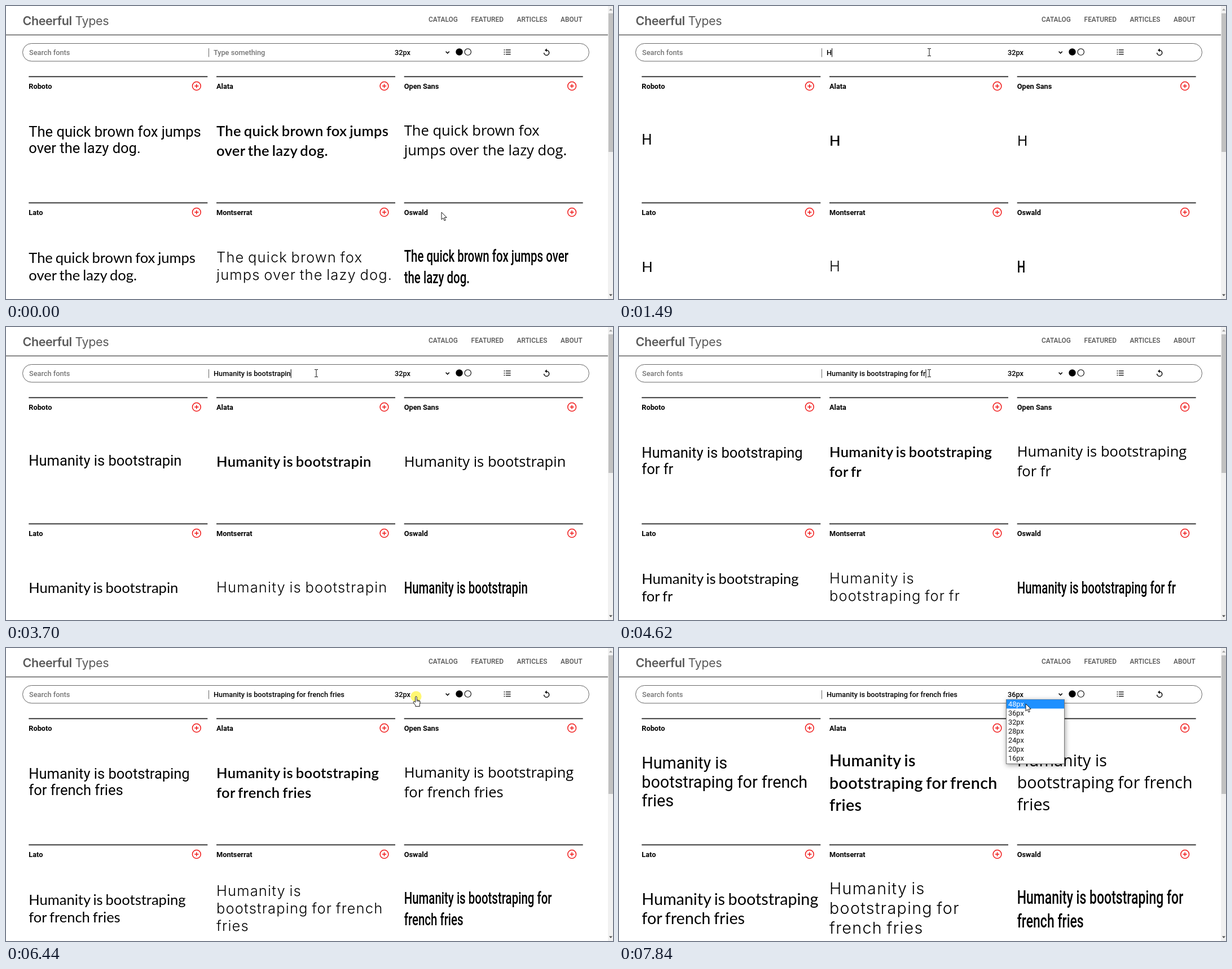
An HTML page that plays this animation: 1076 by 520 pixels, repeating every 8000 ms.

```html
<!DOCTYPE html>
<html lang="en">
<head>
<meta charset="utf-8">
<title>Font catalog</title>
<style>
  html, body { margin: 0; width: 100%; height: 100%; overflow: hidden; background: #fff; }
  svg { display: block; width: 1076px; height: 520px; }
  text { font: 500 12.75px Roboto, sans-serif; white-space: pre; }
  .nav { font-size: 11.9px; fill: #555; }
  .logo { font: 400 21.5px Inter, sans-serif; letter-spacing: -.4px; fill: #5a5a5a; }
  .logo tspan { font-weight: 600; }
  .label { font-weight: 600; }
  .hint { fill: #757575; }
  .item { font-weight: 400; }
</style>
</head>
<body>
<svg id="stage" viewBox="0 0 1076 520" xmlns="http://www.w3.org/2000/svg"></svg>
<script>
const LOOP = 8000;
const SCALE = 0.797;
const SAMPLE = 'The quick brown fox jumps over the lazy dog.';
const PHRASE = 'Humanity is bootstraping for french fries';
const SIZES = [48, 36, 32, 28, 24, 20, 16];

// asc, line, track and gap (word spacing) are in em;
// caps = characters per line for sample, phrase, large phrase
const FACES = [
  { name: 'Roboto', family: 'Roboto', weight: 400, asc: .927, line: 1.172, caps: [27, 27, 23] },
  { name: 'Alata', family: 'Lato', weight: 600, asc: 1.108, line: 1.379, caps: [27, 26, 23], track: .013, gap: -.07 },
  { name: 'Open Sans', family: 'Open Sans', weight: 400, asc: 1.069, line: 1.362, caps: [24, 26, 23] },
  { name: 'Lato', family: 'Lato', weight: 400, asc: .987, line: 1.2, caps: [27, 27, 27], gap: -.06 },
  { name: 'Montserrat', family: 'Inter', weight: 300, asc: .968, line: 1.219, caps: [24, 23, 20], track: .046, gap: -.07 },
  { name: 'Oswald', family: 'Roboto', weight: 500, asc: 1.193, line: 1.482, caps: [33, 34, 30], zoom: 1.137, narrow: .705 }
];

// time of each keystroke
const KEYS = [
  1490, 1560, 1710, 1800, 1880, 1970, 2130, 2210, 2370, 2440, 2510, 2590, 2660,
  2830, 2910, 3000, 3150, 3300, 3300, 3470, 3470, 3620, 3700, 3850, 3920, 4070,
  4160, 4320, 4390, 4620, 4620, 4700, 4870, 4950, 5020, 5170, 5250, 5340, 5430, 5810, 5880
];

// time, x, y, pointer shape, click halo
const POINTER = [
  [0, 772, 366, 'arrow'], [70, 748, 335, 'arrow'], [140, 690, 255, 'arrow'],
  [220, 610, 160, 'arrow'], [290, 560, 111, 'arrow'], [460, 554, 96, 'beam'],
  [540, 551, 85, 'beam'], [620, 550, 82, 'beam'], [700, 550, 82, 'beam', 1],
  [780, 550, 82, 'beam'], [6030, 562, 82, 'beam'], [6100, 605, 83, 'beam'],
  [6180, 662, 85, 'beam'], [6260, 705, 86, 'hand'], [6350, 726, 86, 'hand'],
  [6440, 727, 86, 'hand', 1], [6500, 726, 87, 'arrow'], [6660, 726, 101, 'arrow'],
  [6740, 725, 111, 'arrow'], [6820, 725, 115, 'arrow'], [7000, 725, 117, 'arrow'],
  [7060, 725, 118, 'arrow'], [7220, 725, 118, 'arrow', 1], [7290, 725, 117, 'arrow'],
  [7370, 723, 100, 'arrow'], [7450, 721, 80, 'hand'], [7530, 721, 77, 'hand', 1],
  [7610, 721, 82, 'arrow'], [7690, 721, 90, 'arrow'], [7840, 721, 99, 'arrow']
];

// time, highlighted row (-1 = closed)
const MENU = [[0, -1], [6500, 2], [6660, 0], [6740, 1], [7290, -1], [7610, 1], [7690, 0]];
const CARET_ON = 780, CARET_OFF = 6440, GROW = 7290;

const SHAPES = {
  arrow: `<path d="M0 0V13L3 10.2 5.2 15 7.2 14.1 5.1 9.4H9.2Z" fill="#fff" stroke="#000" stroke-width=".9"/>`,
  beam: `<path d="M-3 -6.5H-.8L0 -6 .8 -6.5H3M0 -6V6M-3 6.5H-.8L0 6 .8 6.5H3" fill="none" stroke="#111"/>`,
  hand: `<path d="M-1.4 1.3C-1.4 -.4 1.3 -.4 1.3 1.3V6.3L5.8 7.4Q7.3 7.9 7.2 9.6L6.3 14.6V17.6H-1.2V15.6L-4.8 10.8Q-5.4 9.2 -4 8.8 -2.9 8.6 -1.4 10.4Z" fill="#fff" stroke="#000" stroke-width=".9"/>
    <path d="M1.3 6V9.4M3.4 7V9.6M5.4 7.5V9.8" stroke="#000" stroke-width=".7"/>`
};

const text = (x, y, str, cls = '') => `<text x="${x}" y="${y}" class="${cls}">${str}</text>`;
const line = (x1, y1, x2, y2, color, w = 1) =>
  `<path d="M${x1} ${y1}L${x2} ${y2}" stroke="${color}" stroke-width="${w}"/>`;
const cellX = i => 40.3 + (i % 3) * 332.7;
const cellY = i => 125 + Math.floor(i / 3) * 224;

function header() {
  const nav = [[749, 'CATALOG'], [824.6, 'FEATURED'], [905.6, 'ARTICLES'], [983, 'ABOUT']];
  return text(29.5, 33.5, '<tspan>Cheerful</tspan> Types', 'logo')
    + nav.map(([x, s]) => text(x, 28.4, s, 'nav')).join('')
    + line(0, 51.3, 1067, 51.3, '#444', 1.3);
}

function toolbar() {
  const rows = [78, 81.8, 85.6].map(y =>
    line(882.6, y, 884.4, y, '#111', 1.5) + line(886, y, 894.6, y, '#111', 1.4)).join('');
  return `<rect x="29.5" y="66.5" width="1004" height="31.5" rx="15.75" fill="none" stroke="#666"/>`
    + line(359.5, 75, 359.5, 90.5, '#666')
    + text(41, 87, 'Search fonts', 'hint')
    + `<path d="M779.6 80.8L782.7 83.9 785.8 80.8" fill="none" stroke="#000" stroke-width="1.6"/>
      <circle cx="803.5" cy="81.5" r="6.2"/>
      <circle cx="818.7" cy="81.5" r="5.7" fill="none" stroke="#000" stroke-width="1.1"/>${rows}
      <path d="M958.2 78.4A4.5 4.5 0 1 1 953.7 82.9" fill="none" stroke="#000" stroke-width="1.5"/>
      <path d="M958.6 75.2V81.6L955.2 78.4Z"/>`;
}

function scrollbar() {
  return `<rect x="1067" width="9" height="520" fill="#f1f1f1"/>
    <rect x="1068" y="13" width="8" height="246" fill="#c1c1c1"/>
    <path d="M1069 8L1072 4.6 1075 8Z" fill="#a3a3a3"/>
    <path d="M1069 511.5L1072 515 1075 511.5Z" fill="#505050"/>`;
}

function cell(face, i) {
  const x = cellX(i), y = cellY(i), cx = x + 297.5, cy = y + 17;
  return line(x, y + .4, x + 317, y + .4, '#222', 1.6)
    + text(x, y + 21.5, face.name, 'label')
    + `<circle cx="${cx}" cy="${cy}" r="7.4" fill="none" stroke="#f01818" stroke-width="1.5"/>`
    + line(cx - 3.6, cy, cx + 3.6, cy, '#f01818', 1.5) + line(cx, cy - 3.6, cx, cy + 3.6, '#f01818', 1.5)
    + `<g id="copy${i}"></g>`;
}

function menu() {
  return `<g id="menu"><rect x="686.5" y="91.5" width="103" height="114" fill="#fff" stroke="#777"
      style="filter:drop-shadow(1px 2px 4px rgba(0,0,0,.4))"/>
    <rect id="mark" x="687" width="102" height="16" fill="#1e90ff"/>`
    + SIZES.map((s, i) => text(690, 103.5 + i * 16, s + 'px', 'item')).join('') + '</g>';
}

const $ = id => document.getElementById(id);
$('stage').innerHTML = header() + toolbar()
  + `<text id="input" x="368" y="87"></text><text id="size" x="689" y="87"></text>
     <path id="caret" stroke="#000" d="M0 75V90.5"/>`
  + FACES.map(cell).join('') + scrollbar() + menu()
  + `<g id="pointer"><circle id="halo" r="9.6" fill="#fff000" fill-opacity=".55"/>`
  + Object.entries(SHAPES).map(([k, s]) => `<g id="${k}">${s}</g>`).join('') + '</g>';
const items = [...document.querySelectorAll('.item')];

const at = (steps, t) => steps.filter(s => s[0] <= t).pop();
const show = (id, on) => $(id).setAttribute('visibility', on ? 'visible' : 'hidden');

function wrap(str, cap) {
  const lines = [''];
  for (const word of str.trim().split(' ')) {
    const last = lines[lines.length - 1];
    const joined = last ? last + ' ' + word : word;
    if (joined.length <= cap || !last) lines[lines.length - 1] = joined;
    else lines.push(word);
  }
  return lines;
}

function setCopy(face, i, str, mode) {
  const { family, weight, asc, line, caps, track = 0, gap = 0, zoom = 1, narrow = 1 } = face;
  const em = (mode === 2 ? 36 : 32) * SCALE;
  const lines = wrap(str, caps[mode]);
  const top = cellY(i) + 112.8 - lines.length * line * em / 2;
  const style = `font:${weight} ${em * zoom}px '${family}',sans-serif;`
    + `letter-spacing:${track * em}px;word-spacing:${gap * em}px`;
  $('copy' + i).innerHTML = lines.map((s, n) => {
    const y = top + (asc + n * line) * em;
    return `<text transform="translate(${cellX(i)} ${y}) scale(${narrow} 1)" style="${style}">${s}</text>`;
  }).join('');
}

let shown = '';
function draw(t) {
  const typed = PHRASE.slice(0, KEYS.filter(k => k <= t).length);
  const mode = t >= GROW ? 2 : typed ? 1 : 0;
  const state = mode + typed;
  if (state !== shown) {
    shown = state;
    FACES.forEach((face, i) => setCopy(face, i, typed || SAMPLE, mode));
    $('input').textContent = typed || 'Type something';
    $('input').setAttribute('class', typed ? '' : 'hint');
    $('size').textContent = mode === 2 ? '36px' : '32px';
  }

  const width = typed ? $('input').getComputedTextLength() : 0;
  $('caret').setAttribute('transform', `translate(${368.5 + width} 0)`);
  show('caret', t >= CARET_ON && t < CARET_OFF);

  const row = at(MENU, t)[1];
  $('menu').style.display = row < 0 ? 'none' : '';
  $('mark').setAttribute('y', 91.5 + Math.max(row, 0) * 16);
  items.forEach((el, i) => el.setAttribute('fill', i === row ? '#fff' : '#111'));

  const [, x, y, shape, click] = at(POINTER, t);
  $('pointer').setAttribute('transform', `translate(${x} ${y})`);
  for (const key in SHAPES) show(key, key === shape);
  show('halo', click);
}

const start = performance.now();
function tick() {
  draw((performance.now() - start) % LOOP);
  requestAnimationFrame(tick);
}
tick();
</script>
</body>
</html>
```
